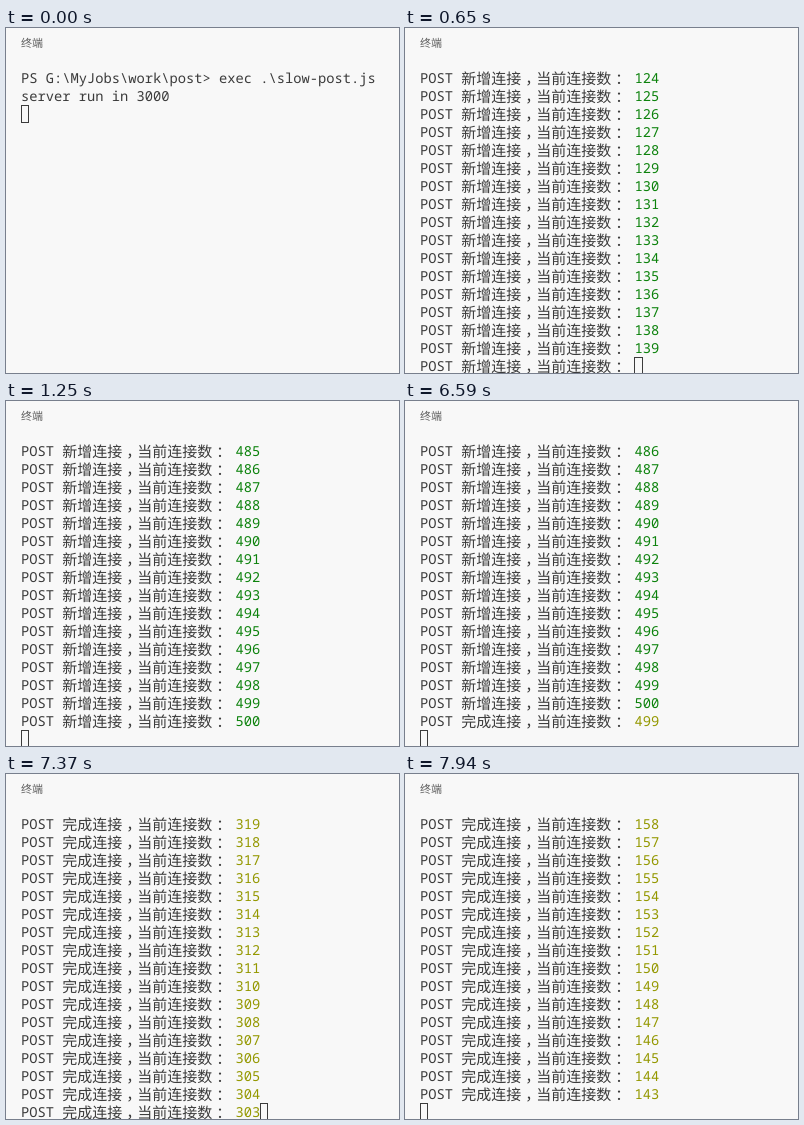
An HTML page with a canvas that plays this animation: 393x345 px, repeating every 8 s.

```html
<!DOCTYPE html>
<html lang="zh-CN">
<head>
<meta charset="utf-8">
<style>
html, body { margin: 0; height: 100%; overflow: hidden; background: #f8f8f8; }
canvas { display: block; }
</style>
</head>
<body>
<canvas id="stage" width="393" height="345"></canvas>
<script>
const ctx = document.getElementById('stage').getContext('2d');
const LOOP = 8000, LEFT = 15, ROW = 18, CELL = 8.25, WIDE = 15, ROWS = 16;
const LABEL_X = LEFT + 5 * CELL, NUMBER_X = LABEL_X + 11 * WIDE + CELL;
const INK = '#3b3b3b', GREEN = '#0c820c', YELLOW = '#949800';
const MONO = '13.75px "Noto Sans Mono", monospace';
const HAN = '"Noto Sans CJK SC", "Noto Sans CJK", sans-serif';

// [time, number of log lines printed so far]
const progress = [[500, 49], [650, 139], [1250, 500], [6589, 500], [6590, 501],
                  [6920, 580], [7370, 696], [7940, 857]];

// Output arrives in bursts, mostly 60 ms apart.
const bursts = [500, 650, 1250, 6590, 6680, 7370, 7400];

function burstTime(t) {
  const start = bursts.filter(b => b <= t).pop();
  if (start === 1250 || start === 6590) return start;
  return start + Math.floor((t - start) / 60) * 60;
}

function linesAt(t) {
  const i = progress.findIndex(p => p[0] >= t);
  if (i < 1) return progress[0][1];
  const [t0, n0] = progress[i - 1], [t1, n1] = progress[i];
  return Math.round(n0 + (n1 - n0) * (t - t0) / (t1 - t0));
}

function text(str, x, y, font, color = INK) {
  ctx.font = font;
  ctx.fillStyle = color;
  ctx.fillText(str, x, y);
}

const mono = (str, x, row, color) => text(str, x, 55 + row * ROW, MONO, color);
const han = (str, column, row, shift = 0) =>
  text(str, LABEL_X + column * WIDE + shift, 56 + row * ROW, WIDE + 'px ' + HAN);

function cursor(x, row) {
  const left = Math.floor(x), right = Math.ceil(x + CELL - .5);
  ctx.strokeStyle = INK;
  ctx.strokeRect(left + .5, 41.5 + row * ROW, right - left - 1, 17);
}

function logLine(n, row, withNumber = true) {
  const opening = n <= 500;
  mono('POST', LEFT, row);
  han((opening ? '新增' : '完成') + '连接', 0, row);
  han('当前连接数', 5, row);
  // Punctuation sits in the middle of its cell.
  han('，', 4, row, 4);
  han('：', 10, row, 4);
  if (withNumber) mono(opening ? n : 1000 - n, NUMBER_X, row, opening ? GREEN : YELLOW);
}

function draw(t) {
  ctx.fillStyle = '#f8f8f8';
  ctx.fillRect(0, 0, 393, 345);
  ctx.textRendering = 'geometricPrecision';
  text('终端', LEFT, 19, '11px ' + HAN, '#5c5c5c');

  if (t < 500) {
    mono('PS G:\\MyJobs\\work\\post> exec .\\slow-post.js', LEFT, 0);
    mono('server run in 3000', LEFT, 1);
    cursor(LEFT, 2);
    return;
  }

  const time = burstTime(t), last = linesAt(time);
  for (let row = 0; row < ROWS; row++) logLine(last - ROWS + 1 + row, row);

  // Two bursts end in the middle of a line.
  if (time === 650) {
    logLine(last + 1, ROWS, false);
    cursor(NUMBER_X, ROWS);
  } else if (time === 7370) {
    logLine(last + 1, ROWS);
    cursor(NUMBER_X + 3 * CELL, ROWS);
  } else {
    cursor(LEFT, ROWS);
  }
}

const begin = performance.now();
function tick() {
  draw((performance.now() - begin) % LOOP);
  requestAnimationFrame(tick);
}
tick();
</script>
</body>
</html>
```
